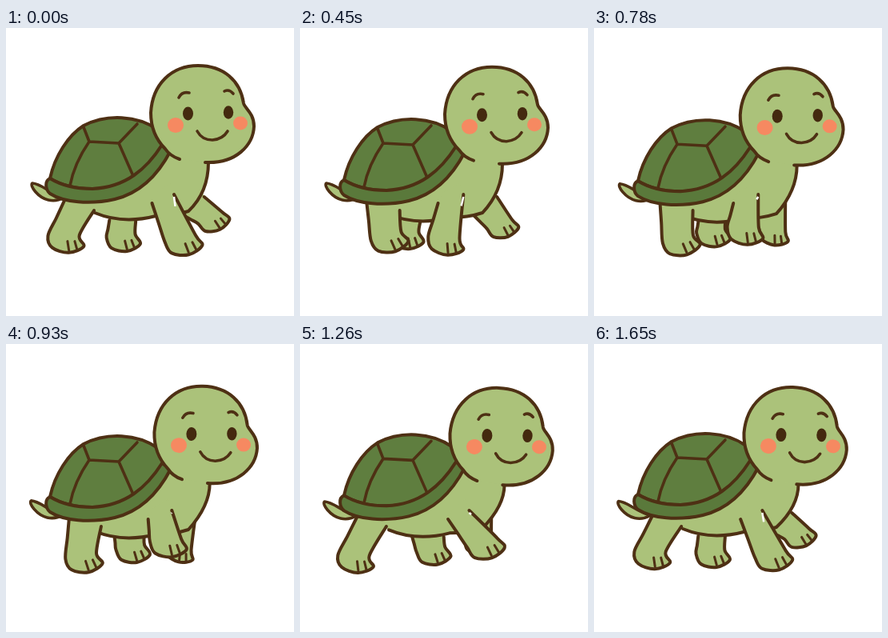
An HTML page with a canvas for the animation above (1680 ms loop, 360 px wide and 360 px high).

```html
<!DOCTYPE html>
<html lang="en">
<head>
<meta charset="utf-8">
<title>Walking turtle</title>
<style>
html, body { margin: 0; width: 100%; height: 100%; overflow: hidden; background: #fff; }
canvas { display: block; width: 100vw; height: 100vh; }
</style>
</head>
<body>
<canvas id="stage"></canvas>
<script>
const LOOP = 1680, STEP = 30, SIZE = 360;
const INK = '#4e3014', SKIN = '#abc27a', SHELL = '#5f7e3f', RIM = '#5a793b', CHEEK = '#f68961', EYE = '#44290f';

// back and front: where the leg joins the body, as x, y and sway.
// The foot swings by reach around x and is furthest forward at peak (ms).
const legs = {
  farBack: {
    back: [131, 240, 9], front: [165, 241, 15],
    x: 150, reach: 18, peak: 1210, ground: 279, lift: 6, liftPeak: 860, pitch: 0.05, size: 0.92
  },
  farFront: {
    back: [208, 234, 17], front: [243, 211, 6],
    x: 240, reach: 30, peak: 180, ground: 271, lift: 18, liftPeak: 40, pitch: 0.4, size: 0.85
  },
  nearBack: {
    back: [77, 216, 7], front: [116, 228, 10],
    x: 90, reach: 28, peak: 590, ground: 286, lift: 7, liftPeak: 240, pitch: 0.18, size: 1
  },
  nearFront: {
    back: [179, 219, 7], front: [208, 208, 4],
    x: 208, reach: 31, peak: 1400, ground: 287, lift: 22, liftPeak: 1050, pitch: 0.2, size: 1
  }
};
// Heel, sole, toe, tip and ankle around the point where the foot touches down.
const FOOT = [[-23, -18], [-16, -4], [5, 0], [23, -10], [16, -23]];
const TOES = [[[2, -14], [5, -3]], [[11, -15], [15, -5]]];

const shapes = {
  dome: 'M55 188C61 160 78 134 97 122C126 107 164 109 190 127L206 148C188 178 155 200 108 201C85 201 68 196 55 188Z',
  rim: 'M55 188C68 196 85 201 108 201C150 199 176 176 195 146L206 153C191 182 169 206 136 214C105 221 72 218 55 207C49 202 48 191 55 188Z',
  plates: 'M97 124L104 142L141 144L164 120M141 144L159 185M104 142C93 158 84 176 80 197',
  tail: 'M72 211C53 206 45 195 33 194C29 197 40 212 53 215C61 217 67 215 72 212',
  head: 'M217 164C208 161 203 157 199 151C187 139 181 123 181 106C183 70 207 47 240 47C272 47 293 66 297 94C298 100 310 106 310 123C309 146 288 170 249 168',
  face: 'M216 87Q220 79 229 81M273 79Q279 76 284 82M239 129Q245 140 258 140Q271 139 277 129'
};
for (const name in shapes) shapes[name] = new Path2D(shapes[name]);

const canvas = document.getElementById('stage');
const ctx = canvas.getContext('2d');

const wave = (t, peak) => Math.cos(2 * Math.PI * (t - peak) / LOOP);
const rise = (t, peak) => 0.5 + 0.5 * wave(t, peak);
const ease = (t, from, to) => {
  const u = Math.min(1, Math.max(0, (t - from) / (to - from)));
  return u * u * (3 - 2 * u);
};

function paint(path, fill, width = 4) {
  if (fill) { ctx.fillStyle = fill; ctx.fill(path); }
  if (width) { ctx.strokeStyle = INK; ctx.lineWidth = width; ctx.stroke(path); }
}

function dot(x, y, rx, ry, color) {
  ctx.fillStyle = color;
  ctx.beginPath();
  ctx.ellipse(x, y, rx, ry, 0, 0, Math.PI * 2);
  ctx.fill();
}

function shifted(x, y, draw) {
  ctx.save();
  ctx.translate(x, y);
  draw();
  ctx.restore();
}

function spline(p) {
  const path = new Path2D();
  path.moveTo(...p[0]);
  for (let i = 0; i < p.length - 1; i++) {
    const a = p[i], b = p[i + 1], before = p[i - 1] || a, after = p[i + 2] || b;
    path.bezierCurveTo(
      a[0] + (b[0] - before[0]) / 6, a[1] + (b[1] - before[1]) / 6,
      b[0] - (after[0] - a[0]) / 6, b[1] - (after[1] - a[1]) / 6, ...b);
  }
  return path;
}

function drawLeg(leg, t) {
  const swing = wave(t, leg.peak);
  const joint = ([x, y, sway]) => [x + sway * swing, y];
  const back = joint(leg.back), front = joint(leg.front);
  const footX = leg.x + leg.reach * swing;
  const footY = leg.ground - leg.lift * rise(t, leg.liftPeak);
  const cos = Math.cos(leg.pitch * swing) * leg.size;
  const sin = -Math.sin(leg.pitch * swing) * leg.size;
  const place = ([x, y]) => [footX + x * cos - y * sin, footY + x * sin + y * cos];

  const foot = FOOT.map(place);
  const shin = [(back[0] + foot[0][0]) / 2, (back[1] + foot[0][1]) / 2];
  const outline = spline([back, shin, ...foot, front]);
  const fill = new Path2D(outline);
  fill.lineTo(front[0] - 5, front[1] - 14);
  fill.lineTo(back[0] + 6, back[1] - 14);
  paint(fill, SKIN, 0);
  paint(outline);

  const toes = new Path2D();
  for (const [from, to] of TOES) {
    toes.moveTo(...place(from));
    toes.lineTo(...place(to));
  }
  paint(toes, null, 3);
}

// Sliver of background behind the planted front leg.
function drawGap(leg, t) {
  const x = leg.front[0] + leg.front[2] * wave(t, leg.peak), y = leg.front[1] + 3;
  const length = 14 * (1 - rise(t, leg.liftPeak));
  ctx.save();
  ctx.lineCap = 'butt';
  ctx.strokeStyle = '#fff';
  ctx.lineWidth = 2.5;
  ctx.beginPath();
  ctx.moveTo(x, y);
  ctx.lineTo(x + 3 * wave(t, leg.peak), y + length);
  ctx.stroke();
  ctx.restore();
}

function drawBody(dx, dy, sag) {
  const x = 253 + dx * 0.4, y = 168 + dy, b = sag - 1;
  const line = `${x} ${y}C${x} ${190 + dy / 2} 246 212 228 ${230 + b}Q210 ${236 + b} 187 ${236 + b}C160 ${243 + b} 135 ${242 + b} 111 ${232 + b}`;
  paint(new Path2D(`M190 150L${line}L72 212Z`), SKIN, 0);
  paint(new Path2D('M' + line));
}

function drawHead(dx, dy, angle) {
  ctx.save();
  ctx.translate(245 + dx, 110 + dy);
  ctx.rotate(angle);
  ctx.translate(-245, -110);
  paint(shapes.head, SKIN);
  dot(212, 121.5, 10, 9.5, CHEEK);
  dot(293, 119, 9, 8.5, CHEEK);
  dot(227.5, 107, 6.5, 8.5, EYE);
  dot(278, 105.5, 6.2, 8.3, EYE);
  paint(shapes.face, null, 3.6);
  ctx.restore();
}

function draw(t) {
  ctx.setTransform(canvas.width / SIZE, 0, 0, canvas.height / SIZE, 0, 0);
  ctx.fillStyle = '#fff';
  ctx.fillRect(0, 0, SIZE, SIZE);
  ctx.lineCap = ctx.lineJoin = 'round';

  // The head leans forward once per loop, with a short nod, then snaps back.
  const lean = ease(t, 600, 1130);
  const nod = Math.exp(-(((t - 1110) / 110) ** 2));
  const headX = 6.3 * lean;
  const headY = 2 * ease(t, 0, 600) + 5.2 * lean + 5.5 * nod;
  const sag = 3.2 * rise(t, 800);

  shifted(-2.2 * lean, 2.5 * lean + 3 * nod, () => paint(shapes.tail, SKIN, 3.6));
  drawLeg(legs.farBack, t);
  drawLeg(legs.farFront, t);
  drawBody(headX, headY, sag);
  drawLeg(legs.nearBack, t);
  drawLeg(legs.nearFront, t);
  drawGap(legs.nearFront, t);
  shifted(0, sag, () => {
    paint(shapes.dome, SHELL);
    paint(shapes.plates, null, 3.6);
    paint(shapes.rim, RIM);
  });
  drawHead(headX, headY, 0.035 * lean);
}

function resize() {
  const ratio = window.devicePixelRatio || 1;
  canvas.width = Math.round(innerWidth * ratio);
  canvas.height = Math.round(innerHeight * ratio);
}

const start = performance.now();
function tick() {
  const t = (performance.now() - start) % LOOP;
  draw(Math.floor(t / STEP) * STEP);
  requestAnimationFrame(tick);
}
addEventListener('resize', resize);
resize();
tick();
</script>
</body>
</html>
```
